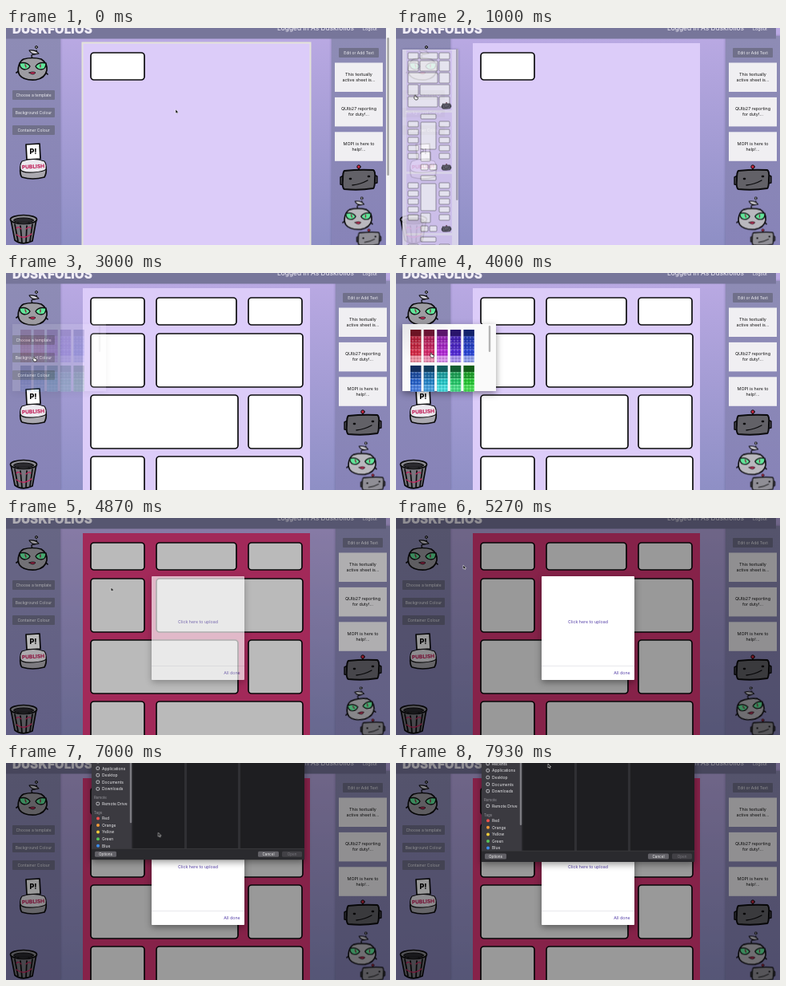
An HTML page that plays this animation: 480x272 px, repeating every 8000 ms.

```html
<!DOCTYPE html>
<html lang="en">
<head>
<meta charset="utf-8">
<title>Sheet builder</title>
<style>
html, body { margin: 0; width: 100%; height: 100%; overflow: hidden; background: #8f8dba; }
svg { display: block; width: 100vw; height: 100vh; }
text { font-family: Inter, "Open Sans", sans-serif; }
.ink { stroke: #0b0b0d; stroke-width: 1.7; stroke-linejoin: round; stroke-linecap: round; }
.button text { font-size: 5px; fill: #eeeef4; text-anchor: middle; }
.card text { font-size: 5.4px; fill: #151515; text-anchor: middle; }
.timed { animation: 8s linear infinite; }
.step { animation-timing-function: step-end; }
#column { animation-name: column; }
#pagebar { animation-name: pagebar; }
#border { animation-name: border; }
#grid { animation-name: grid; }
#sheet { animation-name: sheet; }
#templates { animation-name: templates; }
#palette { animation-name: palette; }
#shade, #modal { animation-name: modal; }
#chip { animation-name: chip; }
#dialog { animation-name: dialog; animation-timing-function: ease-out; }
#cursor { animation-name: cursor; animation-timing-function: ease-in-out; }
#arrow { animation-name: arrow; }
#hand { animation-name: hand; }
#leaner { animation-name: lean; transform-origin: 441px 252px; }
@keyframes column {
  0%, 18.75%, 53.75% { transform: none; }
  10%, 36.9%, 57.5%, 100% { transform: translateX(5px); }
}
@keyframes pagebar {
  0%, 18.75%, 53.75% { opacity: 1; }
  10%, 36.9%, 57.5%, 100% { opacity: 0; }
}
@keyframes border { 0% { opacity: 1; } 10%, 100% { opacity: 0; } }
@keyframes grid { 0% { opacity: 0; } 18%, 100% { opacity: 1; } }
@keyframes sheet { 0% { fill: #dcccf9; } 53%, 100% { fill: #df397a; } }
@keyframes templates {
  0%, 10% { opacity: 0; }
  12.5% { opacity: .84; }
  14%, 18% { opacity: 1; }
  21%, 100% { opacity: 0; }
}
@keyframes palette {
  0%, 37% { opacity: 0; }
  40.5%, 52.5% { opacity: 1; }
  55.5%, 100% { opacity: 0; }
}
@keyframes modal {
  0%, 57.5% { opacity: 0; }
  60.9% { opacity: .68; }
  63.5%, 100% { opacity: 1; }
}
@keyframes chip { 0% { opacity: 0; } 75.5% { opacity: 1; } 84%, 100% { opacity: 0; } }
@keyframes dialog { 0%, 83.5% { transform: translateY(-140px); } 88%, 100% { transform: none; } }
@keyframes cursor {
  0%, 1% { transform: translate(212px, 102px); }
  9%, 10.5% { transform: translate(34px, 85px); }
  12.5%, 18.5% { transform: translate(23px, 84px); }
  25.9% { transform: translate(32px, 77px); }
  32%, 40% { transform: translate(34px, 105px); }
  47%, 53% { transform: translate(43px, 100px); }
  57%, 59% { transform: translate(140px, 92px); }
  65.9% { transform: translate(84px, 59px); }
  67.5%, 70% { transform: translate(193px, 97px); }
  76.5%, 84% { transform: translate(231px, 127px); }
  91% { transform: translate(150px, 48px); }
  98.5%, 100% { transform: translate(190px, 1px); }
}
@keyframes arrow {
  0%, 19%, 53.5%, 84% { opacity: 1; }
  8.5%, 30%, 75.5% { opacity: 0; }
}
@keyframes hand {
  0%, 19%, 53.5%, 84% { opacity: 0; }
  8.5%, 30%, 75.5% { opacity: 1; }
}
@keyframes lean {
  0%, 57% { transform: none; }
  60.5%, 79% { transform: rotate(-9deg); }
  83%, 100% { transform: none; }
}
</style>
</head>
<body>
<svg viewBox="0 0 480 272" preserveAspectRatio="none">
  <defs>
    <linearGradient id="wall" x2="0" y2="1"><stop stop-color="#bbaae4"/><stop offset="1" stop-color="#8e8fc5"/></linearGradient>
    <linearGradient id="side" x2="0" y2="1"><stop stop-color="#8e8cb5"/><stop offset="1" stop-color="#8783b8"/></linearGradient>
    <linearGradient id="paper" x2="1" y2="1"><stop stop-color="#e6e6e8"/><stop offset=".3" stop-color="#fafafa"/></linearGradient>
    <pattern id="dots" width="4" height="4" patternUnits="userSpaceOnUse">
      <circle cx="1" cy="1" r=".65" fill="#fff" opacity=".55"/><circle cx="3" cy="3" r=".65" fill="#112" opacity=".4"/>
    </pattern>
    <filter id="shadow" x="-20%" y="-20%" width="140%" height="150%"><feDropShadow dx="0" dy="3" stdDeviation="4" flood-opacity=".4"/></filter>
    <filter id="soft" x="-20%" y="-5%" width="140%" height="110%"><feDropShadow dx="0" dy="0" stdDeviation="1.8" flood-color="#44406e" flood-opacity=".5"/></filter>

    <g id="dishBot" class="ink">
      <path d="M0-13Q-3-18 2-18T5-23" fill="none" stroke-width="1.3"/>
      <path d="M-4-23Q-1-17 8-19Q4-24-4-23Z" fill="#d6d4dc" stroke-width="1.1"/>
      <circle cx="5" cy="-27" r="1.5" fill="#aaa" stroke-width="1"/>
      <path d="M-17 3-20 5M16 4 19 7" fill="none"/>
      <path d="M-11-12Q0-15 11-12Q19-7 18 2Q16 12 4 14Q-11 15-16 8Q-19 3-17-4Q-15-10-11-12Z" fill="currentColor"/>
      <path d="M-16-7Q-7-9-3-3Q-5 1-10 1Q-16 0-16-7ZM4-3Q8-9 17-7Q17 1 11 1Q6 1 4-3Z" fill="#62e59a" stroke-width="1.3"/>
      <path d="M-9-5-8-2M10-5 10-2" stroke="#8c2342" stroke-width="1.4"/>
      <path d="M-4 5Q1 3 4 5Q1 9-4 5Z" fill="#d12f5c" stroke-width=".8"/>
    </g>
    <g id="boxBot" class="ink">
      <path d="M0-12V-15" fill="none"/><circle cy="-16" r="2.2" fill="#d32840" stroke-width="1"/>
      <path d="M-19-5-23-3V6L-19 7M19-6 23-4V4L19 5" fill="#48474d" stroke-width="1.4"/>
      <path d="M-18-11Q0-13 18-12Q21-11 20 0Q20 10 18 11Q0 14-18 12Q-21 11-20 0Q-20-10-18-11Z" fill="currentColor" stroke-width="2"/>
      <path d="M-11-1H-10M12-4H13" fill="none" stroke-width="2.6"/>
      <path d="M-8 7Q2 6 11 1" fill="none" stroke-width="1.4"/>
    </g>
    <g id="publish" class="ink">
      <path d="M25 146 42 145 43 164 26 165Z" fill="#fff"/>
      <path d="M18 174Q17 184 20 187Q33 191 48 187Q51 182 50 174Z" fill="#aaa8af"/>
      <path d="M20 167Q34 162 48 167Q51 171 50 177Q48 180 34 181Q20 182 18 177Q17 171 20 167Z" fill="#ece9ef" stroke-width="1.2"/>
      <g stroke="none" font-weight="800" text-anchor="middle">
        <text x="34" y="158" font-size="9">P!</text>
        <text x="34" y="176" font-size="6.6" fill="#c01f58" transform="rotate(-3 34 174)">PUBLISH</text>
      </g>
    </g>
    <g id="bin" class="ink">
      <path d="M6 240 11 266Q20 273 33 267L38 240Z" fill="#77767d"/>
      <path d="M11 246 15 267M18 248 20 269M26 248 25 269M33 246 30 267" fill="none"/>
      <path d="M13 251Q16 248 19 252M25 252Q29 248 31 251M13 259Q22 266 32 258" fill="none" stroke="#c2285f" stroke-width="1.2"/>
      <ellipse cx="22" cy="240" rx="16.500" ry="5.500" fill="#8d8c92"/>
      <ellipse cx="22" cy="241" rx="12.500" ry="3" fill="#2b2a2f" stroke-width="1"/>
    </g>
  </defs>

  <rect width="480" height="272" fill="url(#wall)"/>
  <rect width="68" height="272" fill="url(#side)" filter="url(#soft)"/>
  <rect id="sheet" class="timed step" x="96" y="19" width="284" height="260" fill="#dcccf9"/>
  <rect id="border" class="timed step" x="95.5" y="18.5" width="285" height="260" fill="none" stroke="#e4e3d8" stroke-width="2"/>
  <g id="first" class="ink" fill="#fff"></g>
  <g id="grid" class="ink timed step" fill="#fff"></g>

  <g id="left">
    <use href="#dishBot" x="33" y="51" color="#9d9ca2"/>
    <use href="#publish"/>
    <use href="#bin"/>
  </g>
  <g id="column" class="timed step">
    <rect x="407" y="10" width="80" height="270" fill="url(#side)" filter="url(#soft)"/>
    <g id="cards"></g>
    <use href="#boxBot" x="441" y="190" color="#626167"/>
    <g id="leaner" class="timed"><use href="#dishBot" transform="translate(440 239) scale(.95)" color="#b9b8be"/></g>
    <use href="#boxBot" transform="translate(453.500 264) scale(.66)" color="#8f8e95"/>
  </g>

  <rect width="475" height="13.500" fill="#77769a"/>
  <text x="8" y="6.5" font-size="15.3" font-weight="900" fill="#f0edf6">DUSKFOLIOS</text>
  <text x="339" y="3" font-size="8.4" fill="#f4f2fa">Logged In As Duskfolios</text>
  <text x="446" y="3" font-size="5.4" fill="#f4f2fa">Logout</text>
  <g id="pagebar" class="timed step">
    <rect x="475" width="5" height="272" fill="#f4f4f4"/>
    <rect x="476.3" y="12" width="2.6" height="173" rx="1.3" fill="#a6a6a6"/>
  </g>

  <g id="templates" class="timed">
    <rect x="8" y="27" width="70" height="250" fill="#e6e0f2" filter="url(#soft)"/>
    <g id="thumbs" fill="#f6f4fa" stroke="#77727f" stroke-width=".8"></g>
    <rect x="75" y="26" width="2.6" height="190" rx="1.3" fill="#a3a0ac"/>
  </g>

  <g id="palette" class="timed">
    <rect x="8" y="64" width="117" height="84" fill="url(#paper)" filter="url(#shadow)"/>
    <g id="swatches"></g>
    <rect x="115.8" y="66" width="2.4" height="33" rx="1.2" fill="#b4b4b4"/>
  </g>

  <g id="shade" class="timed"><rect width="480" height="272" opacity=".4"/></g>
  <g id="modal" class="timed">
    <rect x="182" y="73" width="116" height="130" rx="1" fill="#fff" filter="url(#shadow)"/>
    <rect id="chip" class="timed step" x="212" y="124" width="55" height="12" rx="1.5" fill="#ece8fa"/>
    <path d="M182 185.5H298" stroke="#e4e4e8" stroke-width=".8"/>
    <g font-size="5.3" fill="#5640a8" text-anchor="middle">
      <text x="240" y="131.5">Click here to upload</text>
      <text x="282.5" y="196">All done</text>
    </g>
  </g>

  <g id="dialog" class="timed">
    <rect x="107" y="-6" width="266" height="130" fill="#2c2c2f" filter="url(#shadow)"/>
    <rect x="107" y="-6" width="50" height="116" fill="#3b3a40"/>
    <rect x="158.5" y="-6" width="214.5" height="116" fill="#1e1e21"/>
    <path d="M224.5-6V110M291.5-6V110" stroke="#303034" stroke-width="3"/>
    <rect x="154.8" y="-6" width="2.4" height="84" rx="1" fill="#7d7c82"/>
    <path d="M107 110.2H373" stroke="#3f3f43" stroke-width=".7"/>
    <g id="places"></g>
  </g>

  <g id="cursor" class="timed">
    <path id="arrow" class="timed step" d="M0 0V5L1.2 4 2 5.6 2.9 5.2 2.2 3.7H3.7Z" fill="#111" stroke="#fff" stroke-width=".5"/>
    <path id="hand" class="timed step" d="M.8 0Q1.8 0 1.8 1V2.3L4.3 2.9V4.6L3.5 6H1.2L-.6 3.6.1 3.2V.8Z" fill="#fff" stroke="#111" stroke-width=".7"/>
  </g>
</svg>
<script>
const $ = id => document.getElementById(id);
const add = (id, markup) => $(id).insertAdjacentHTML('beforeend', markup);
const box = (x, y, w, h, extra = '') =>
  `<rect x="${x}" y="${y}" width="${w}" height="${h}" ${extra}/>`;
const label = (x, y, text, extra = '') => `<text x="${x}" y="${y}" ${extra}>${text}</text>`;
const button = (x, y, w, text) =>
  `<g class="button">${box(x, y, w, 12, 'rx="1" fill="#70708a"')}${label(x + w / 2, y + 7.8, text)}</g>`;

// Sheet containers
add('first', box(106, 31, 67, 34, 'rx="4"'));
[
  [31, 34, [[188, 100], [303, 67]]],
  [76, 67, [[106, 67], [188, 183]]],
  [153, 67, [[106, 184], [303, 67]]],
  [230, 67, [[106, 67], [188, 183]]]
].forEach(([y, h, cells]) => cells.forEach(([x, w]) => add('grid', box(x, y, w, h, 'rx="4"'))));

// Side columns
['Choose a template', 'Background Colour', 'Container Colour']
  .forEach((text, i) => add('left', button(8, 78 + 22 * i, 53, text)));
add('cards', button(416, 25, 50, 'Edit or Add Text'));
[['This textually', 'active sheet is...'], ['QUIb27 reporting', 'for duty!...'], ['MOPI is here to', 'help!...']]
  .forEach((lines, i) => {
    const y = 43.5 + 43.4 * i;
    add('cards', `<g class="card">${box(411, y, 60, 36.5, 'fill="#f0eff2"')}${
      lines.map((line, j) => label(441, y + 16.5 + 7 * j, line)).join('')}</g>`);
  });

// Template thumbnails
const thumbBot = y => `<use href="#boxBot" transform="translate(63 ${y}) scale(.26)" color="#55545b"/>`;
const sheetBack = (y, h) => box(13, y, 57, h, 'fill="#d9caf3" stroke="none"');
add('thumbs', sheetBack(28, 75));
[[[15, 13], [30, 22], [54, 13]], [[15, 13], [30, 22], [54, 13]], [[15, 37], [54, 13]], [[15, 13], [30, 37]], [[15, 37], [54, 13]]]
  .forEach((row, i) => row.forEach(([x, w]) =>
    add('thumbs', box(x, i ? 26 + 15 * i : 31, w, i ? 13 : 8, 'rx="1"'))));
add('thumbs', thumbBot(98));
for (const y of [106, 183, 260]) {
  add('thumbs', sheetBack(y, 74) + box(31, y + 2, 19, 6, 'rx="1"') +
    box(31, y + 12, 19, 34, 'rx="1"') + box(31, y + 49, 12, 12, 'rx="1"') +
    box(31, y + 65, 9, 7, 'rx="1"') + box(42, y + 65, 9, 7, 'rx="1"'));
  for (let i = 0; i < 5; i++)
    for (const x of [15, 54]) add('thumbs', box(x, y + 11 + 10 * i, 13, 7, 'rx="1"'));
  add('thumbs', thumbBot(y + 69));
}

// Colour swatches
const swatches = (top, hues, lights) => hues.forEach((hue, col) => lights.forEach((light, row) => {
  const x = 18 + 16.6 * col, y = top + 8.2 * row;
  add('swatches', box(x, y, 13.5, 8.2, `fill="hsl(${hue} 68% ${light}%)"`));
  if (row) add('swatches', box(x, y, 13.5, 8.2, 'fill="url(#dots)"'));
}));
swatches(71, [350, 338, 288, 254, 230], [25, 41, 44, 49, 74]);
swatches(116, [218, 205, 180, 145, 125], [22, 37, 46, 57]);

// File dialog
const place = (x, y, text, fill = '#e8e8ea', size = 5) =>
  add('places', label(x, y, text, `font-size="${size}" fill="${fill}"`));
['Recents', 'Applications', 'Desktop', 'Documents', 'Downloads', 'Remote Drive'].forEach((text, i) => {
  const y = i < 5 ? 2.8 + 8.6 * i : 55.8;
  place(120, y, text);
  add('places', box(113, y - 3.8, 3.6, 3.6, 'rx="1" fill="none" stroke="#dcdce0" stroke-width=".8"'));
});
place(110, 47.5, 'Remote', '#98979d', 4.4);
place(110, 66.5, 'Tags', '#98979d', 4.4);
Object.entries({ Red: '#f0524e', Orange: '#f29a37', Yellow: '#f2cd3b', Green: '#56c45a', Blue: '#3c8df0' })
  .forEach(([name, color], i) => {
    const y = 74 + 8.6 * i;
    place(120, y, name);
    add('places', `<circle cx="115" cy="${y - 1.8}" r="2" fill="${color}"/>`);
  });
[[111, 27, 'Options', '#eee'], [315, 26, 'Cancel', '#eee'], [345, 25, 'Open', '#77767c']]
  .forEach(([x, w, text, color]) => add('places',
    box(x, 113.5, w, 7, `rx="1.5" fill="${text === 'Open' ? '#424146' : '#626167'}"`) +
    label(x + w / 2, 118.7, text, `font-size="4.6" text-anchor="middle" fill="${color}"`)));
</script>
</body>
</html>
```
